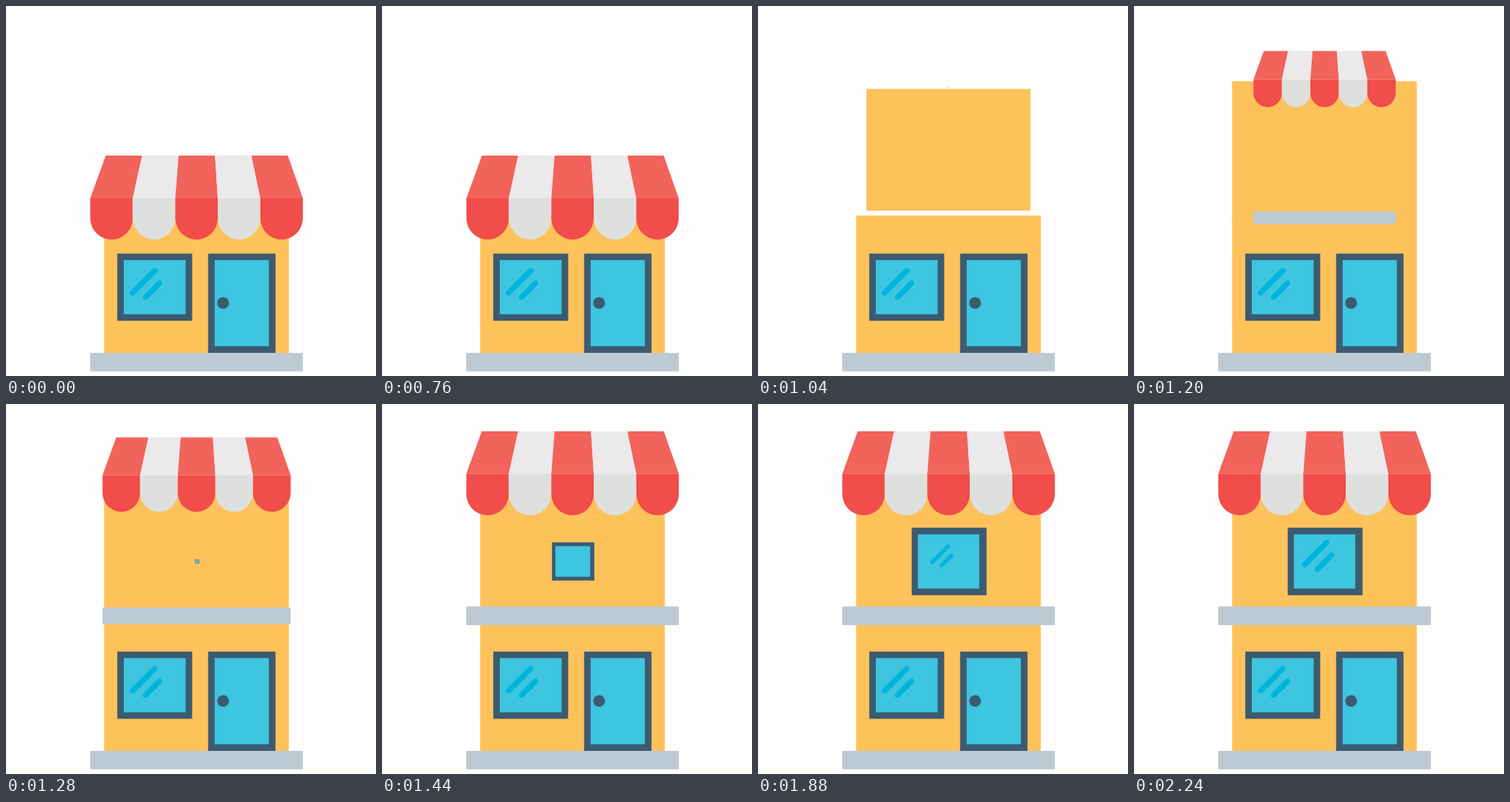
Recreate the animation shown at these times as an HTML page. Size 512 px wide and 512 px high, loop 5000 ms.

```html
<!DOCTYPE html>
<html lang="en">
<head>
<meta charset="utf-8">
<title>Growing shop</title>
<style>
  html, body { margin: 0; height: 100%; overflow: hidden; background: #fefefe; }
  svg { display: block; width: 100%; height: 100%; }
  .wall { fill: #fec25b; }
  .frame { fill: #3c5a70; }
  .glass { fill: #3ec5e0; }
  .slab { fill: #bdcad4; }
  .shine { fill: none; stroke: #00b5da; stroke-width: 7.6; stroke-linecap: round; }
</style>
</head>
<body>
<svg viewBox="0 0 512 512">
  <defs>
    <g id="awning"></g>
    <path id="shine" class="shine" d="M175.3 396.7L205.8 366.2M193 403L212.2 383.8"/>
  </defs>

  <rect class="wall" x="135.7" y="290" width="255.7" height="190"/>
  <rect class="slab" x="116.5" y="480" width="294.3" height="25.6"/>
  <rect class="frame" x="154" y="342.6" width="103.6" height="93"/>
  <rect class="glass" x="163" y="351.6" width="85.6" height="75"/>
  <use href="#shine"/>
  <rect class="frame" x="279.7" y="342.6" width="93.2" height="137.4"/>
  <rect class="glass" x="288.8" y="351.6" width="75" height="119.2"/>
  <circle class="frame" cx="300.4" cy="411" r="8.1"/>

  <g id="lowAwning"><use href="#awning"/></g>
  <rect id="topWall" class="wall" x="135.7" y="104" width="255.7" height="190"/>
  <rect id="ledge" class="slab" x="116.5" y="280.2" width="294.3" height="25.8"/>
  <g id="topAwning"><use href="#awning" y="-169.2"/></g>
  <g id="topWindow">
    <rect class="frame" x="212.7" y="171.2" width="103.6" height="93.4"/>
    <rect class="glass" x="221.2" y="180.4" width="85" height="75"/>
  </g>
  <g id="topShine"><use href="#shine" x="60.8" y="-174.5"/></g>
</svg>

<script>
const LOOP = 5000, STEP = 40;
const $ = id => document.getElementById(id);

// Five stripes: slanted roof part and rounded flap
const stripes = [0, 1, 2, 3, 4].map(i => {
  const top = 138 + 50.4 * i, low = 116.6 + 58.84 * i, next = low + 58.84, r = 29.42;
  const [roof, flap] = i % 2 ? ['#ebe9ea', '#dde0dd'] : ['#f2635b', '#f14d4a'];
  return `<path fill="${roof}" d="M${top} 207H${top + 50.4}L${next} 266H${low}Z"/>
    <path fill="${flap}" d="M${low} 266H${next}V293.8A${r} ${r} 0 0 1 ${low} 293.8Z"/>`;
});
$('awning').innerHTML = stripes.join('');

// id, centre x and y, start, duration, scale from and to
const moves = [
  ['lowAwning', 263.8, 281.2, 752, 310, 1, 0],
  ['topWall', 263.5, 199, 912, 208, 0, 1],
  ['ledge', 263.7, 293.1, 1012, 438, 0, 1],
  ['topAwning', 263.8, 112, 1012, 438, 0, 1],
  ['topWindow', 264.5, 217.9, 1187, 670, 0, 1],
  ['topShine', 254.5, 209.8, 1560, 690, 0, 1],
];

// cubic-bezier(.4, 0, .2, 1)
function ease(x) {
  if (x <= 0) return 0;
  if (x >= 1) return 1;
  const curve = (u, a, b) => 3 * u * (1 - u) ** 2 * a + 3 * u * u * (1 - u) * b + u ** 3;
  let lo = 0, hi = 1;
  for (let i = 0; i < 24; i++) {
    const mid = (lo + hi) / 2;
    if (curve(mid, .4, .2) < x) lo = mid; else hi = mid;
  }
  return curve(lo, 0, 1);
}

function draw(time) {
  const t = Math.floor(time % LOOP / STEP) * STEP;
  for (const [id, x, y, start, duration, from, to] of moves) {
    const scale = from + (to - from) * ease((t - start) / duration);
    const node = $(id);
    node.setAttribute('visibility', scale > .002 ? 'visible' : 'hidden');
    node.setAttribute('transform', `translate(${x} ${y}) scale(${scale}) translate(${-x} ${-y})`);
  }
}

const begin = performance.now();
function tick() {
  draw(performance.now() - begin);
  requestAnimationFrame(tick);
}
tick();
</script>
</body>
</html>
```
